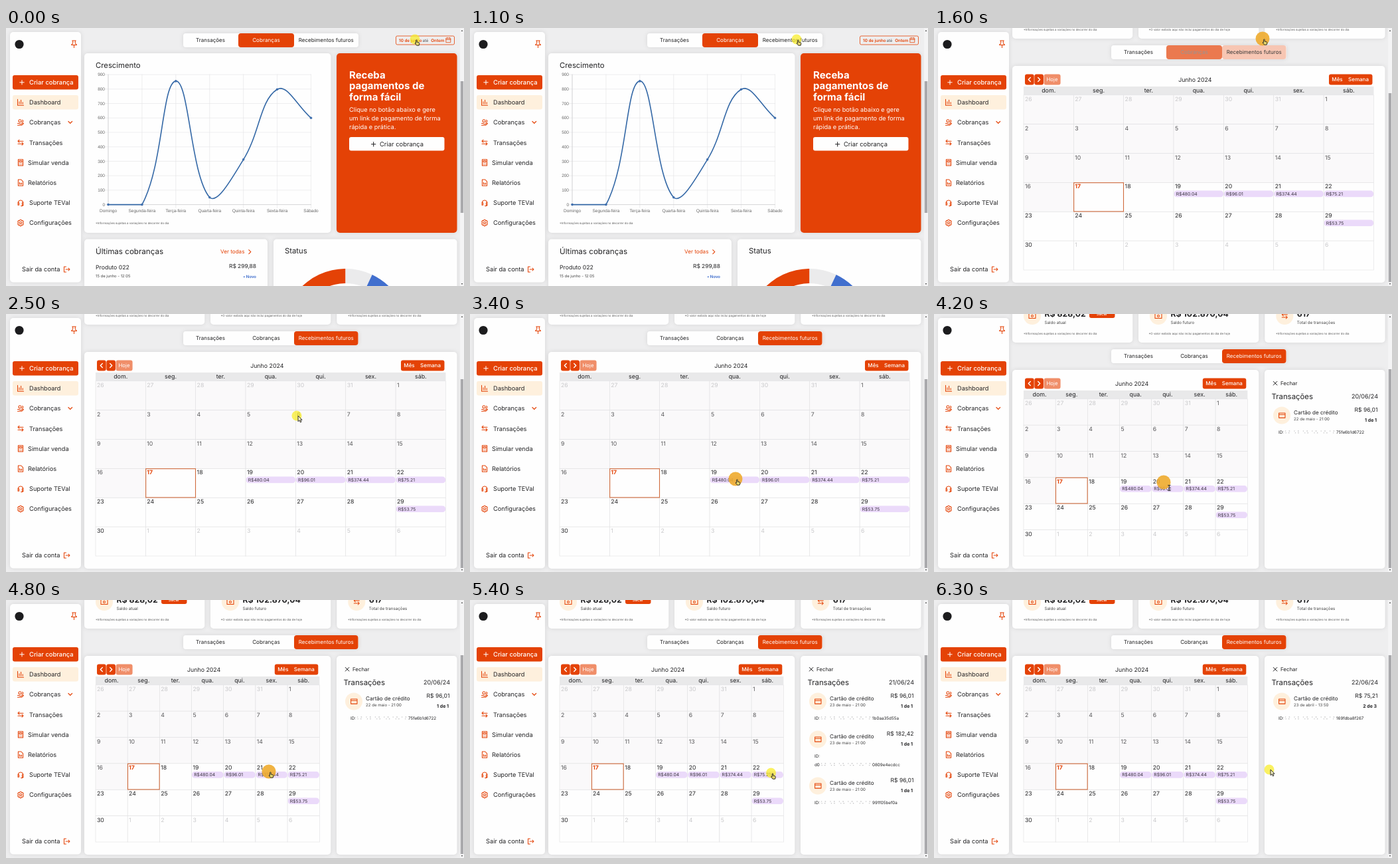
Write an HTML page that moves like this. It is 690x388 px and loops after 6700 ms.

```html
<!DOCTYPE html>
<html lang="pt-BR">
<head>
<meta charset="utf-8">
<title>Painel de cobranças</title>
<style>
  html, body { margin: 0; width: 100%; height: 100%; overflow: hidden; background: #eeeeef; }
  svg { display: block; width: 100vw; height: 100vh; }
  text { font-family: Inter, "Noto Sans", sans-serif; white-space: pre; text-rendering: geometricPrecision; }
  .axis text { font-family: "Liberation Sans", Arial, sans-serif; }
  .line { fill: none; stroke-linecap: round; stroke-linejoin: round; }
  .card { filter: drop-shadow(0 0 3px rgba(0, 0, 0, .1)); }
</style>
</head>
<body>
<svg id="stage" viewBox="0 0 690 388" xmlns="http://www.w3.org/2000/svg"></svg>
<script>
const ORANGE = '#e44206', INK = '#232325', CREAM = '#fef0dd', LOOP = 6700, TICK = 100;

// Drawing helpers
const text = (x, y, size, str, { fill = INK, weight = 400, anchor = 'start' } = {}) =>
  `<text x="${x}" y="${y}" font-size="${size}" fill="${fill}" font-weight="${weight}" text-anchor="${anchor}">${str}</text>`;
const rect = (x, y, w, h, fill, r = 0, more = '') =>
  `<rect x="${x}" y="${y}" width="${w}" height="${h}" rx="${r}" fill="${fill}" ${more}/>`;
const card = (x, y, w, h, fill = '#fefefe') => rect(x, y, w, h, fill, 5, 'class="card"');
const line = (d, color = ORANGE, w = 1.05, more = '') =>
  `<path class="line" d="${d}" stroke="${color}" stroke-width="${w}" ${more}/>`;
const icon = (x, y, d, color = ORANGE, w = 1.05) =>
  `<g transform="translate(${x} ${y})">${line(d, color, w)}</g>`;
const group = (id, body) => `<g id="${id}">${body}</g>`;
const mid = { anchor: 'middle' }, end = { anchor: 'end' }, white = { fill: '#fff' };

const PLUS = 'M-3.2 0H3.2M0-3.2V3.2', RIGHT = 'M-1.5-3L1.5 0L-1.5 3', LEFT = 'M1.5-3L-1.5 0L1.5 3';
const SWAP = 'M-4-2H4M-2-4l-2 2 2 2M4 2H-4M2 0l2 2-2 2';
const CREDIT = 'M-4.7-3.6h9.4v7.2h-9.4zM-4.7-1.2h9.4';
const BILL = 'M-5-3.5h10v7h-10zM-1.5 0a1.5 1.5 0 1 0 3 0a1.5 1.5 0 1 0-3 0';

function sidebar() {
  const items = [
    ['Dashboard', 35, 'M-4.5-4.5V4.5H4.5M-2-1V2.3M.6-3.5V2.3M3.2 0V2.3'],
    ['Cobranças', 35, 'M-4.5 1.5h2l2 1h2M-4.5 4.3h6l3-2.6-1-.8-2 1.3M-3-2.2a2 2 0 1 0 4 0a2 2 0 1 0-4 0M1.6-.6a1.5 1.5 0 1 0 1-2.8'],
    ['Transações', 35, SWAP],
    ['Simular venda', 33, 'M-3.6-4.6h7.2v9.2h-7.2zM-2-3h4v2h-4zM-2 1h.1M0 1h.1M2 1h.1M-2 3h.1M0 3h.1M2 3h.1'],
    ['Relatórios', 33, 'M-3.6-4.6h4.4l2.8 2.8v6.4h-7.2zM-1.6 2.5v-3M0 2.5V.8M1.6 2.5v-2'],
    ['Suporte TEVal', 35, 'M-4 1a4 4.8 0 0 1 8 0M-4 0h1.6v3.4h-1.6zM2.4 0h1.6v3.4h-1.6zM4 3.4q0 1.6-3.4 1.4'],
    ['Configurações', 35, 'M-1.6 0a1.6 1.6 0 1 0 3.2 0a1.6 1.6 0 1 0-3.2 0M-1-4.6h2l.5 1.5 1.8-.3 1 1.8-1 1.6 1 1.6-1 1.8-1.8-.3-.5 1.5h-2l-.5-1.5-1.8.3-1-1.8 1-1.6-1-1.6 1-1.8 1.8.3z'],
  ];
  return card(6, 6, 107, 376.5) +
    `<circle cx="20" cy="24.5" r="6.6" fill="#1c1c1e"/>` +
    icon(102.5, 24, 'M-2.8-5h5.6M-1.8-5v4l-2.2 2.4h8l-2.2-2.4v-4M0 1.4v4') +
    rect(10, 71, 99, 21.5, ORANGE, 3) + icon(24, 81.8, PLUS, '#fff', 1) +
    text(35, 85, 9.4, 'Criar cobrança', { fill: '#fff', weight: 500 }) +
    rect(10, 101, 99, 21.5, CREAM, 3) +
    items.map(([name, x, d], i) => {
      const y = 111.8 + 30.2 * i;
      return icon(22, y, d) + text(x, y + 3.3, 9.2, name);
    }).join('') +
    line('M94 140.5l2.8 2.8l2.8-2.8', ORANGE, 1.2) +
    text(24, 366.4, 9.25, 'Sair da conta') +
    icon(91.5, 363, 'M-1-4h-3v8h3M-1.5 0h6M2.5-2l2 2-2 2');
}

function tabs() {
  return rect(267, -10.5, 264, 21, '#fefefe', 4, 'class="card"') +
    rect(350, -10.5, 84, 21, ORANGE, 4, 'id="tab1"') + rect(434, -10.5, 96.5, 21, ORANGE, 4, 'id="tab2"') +
    text(308, 2.7, 8, 'Transações', mid) +
    `<g id="name1">${text(392, 2.7, 8.1, 'Cobranças', { ...mid, fill: 'inherit' })}</g>` +
    `<g id="name2">${text(482.3, 2.7, 8, 'Recebimentos futuros', { ...mid, fill: 'inherit' })}</g>`;
}

const NOTE = '*Informações sujeitas a variações no decorrer do dia';
const note = (x, y, str = NOTE) => text(x, y, 4.4, str, { fill: '#555' });

function chart() {
  const days = ['Domingo', 'Segunda-feira', 'Terça-feira', 'Quarta-feira', 'Quinta-feira', 'Sexta-feira', 'Sábado'];
  const values = [0, 0, 855, 50, 312, 798, 600];
  const px = i => 154 + 50.92 * i, py = v => 265.6 - v * 0.2172;
  const pts = values.map((v, i) => [px(i), py(v)]);
  let out = '';
  for (let v = 0; v <= 900; v += 100)
    out += line(`M149.5 ${py(v)}H459.5`, '#e2e2e4', 0.6) + text(149, py(v) + 2.2, 6.5, v, { ...end, fill: '#666' });
  days.forEach((d, i) => {
    out += line(`M${px(i)} 70V270.5`, '#e2e2e4', 0.6) + text(px(i), 277, 6.5, d, { ...mid, fill: '#666' });
  });
  out += line('M154 70V265.6H459.5', '#c8c8ca', 0.6);

  // Smooth curve: control points follow the neighbours' chord, kept inside the plot
  const cap = y => Math.max(70, Math.min(265.6, y));
  const handles = pts.map((p, i) => {
    const a = pts[i - 1] || p, b = pts[i + 1] || p;
    const da = Math.hypot(p[0] - a[0], p[1] - a[1]), db = Math.hypot(b[0] - p[0], b[1] - p[1]);
    const fa = 0.4 * da / (da + db), fb = 0.4 * db / (da + db);
    const dx = b[0] - a[0], dy = b[1] - a[1];
    return [[p[0] - fa * dx, cap(p[1] - fa * dy)], [p[0] + fb * dx, cap(p[1] + fb * dy)]];
  });
  const curve = pts.map((p, i) => i ? `C${handles[i - 1][1]} ${handles[i][0]} ${p}` : `M${p}`).join('');
  out += line(curve, '#3468a6', 1.6);
  out += pts.map(([x, y]) => `<circle cx="${x}" cy="${y}" r="1.8" fill="#3f6fae"/>`).join('');
  return `<g class="axis">${out}</g>`;
}

function donut() {
  const at = (r, deg) => {
    const a = deg * Math.PI / 180;
    return `${511.5 + r * Math.sin(a)} ${456 - r * Math.cos(a)}`;
  };
  const arc = (a, b, fill) =>
    `<path d="M${at(94, a)}A94 94 0 0 1 ${at(94, b)}L${at(72, b)}A72 72 0 0 0 ${at(72, a)}z" fill="${fill}"/>`;
  return arc(-100, 0, ORANGE) + arc(0, 25.3, '#ebebec') + arc(25.3, 100, '#416fce');
}

function overview() {
  const heading = ['Receba', 'pagamentos de', 'forma fácil'];
  const body = ['Clique no botão abaixo e gere', 'um link de pagamento de forma', 'rápida e prática.'];
  const bold = { fill: ORANGE, weight: 600 };
  return rect(587.5, 12, 88, 13, 'none', 2, `stroke="${ORANGE}" stroke-width=".8"`) +
    text(592, 20.6, 6.3, '10 de junho', bold) + text(627.5, 20.6, 6.1, 'até', { fill: '#555' }) +
    text(660.5, 20.6, 6.3, 'Ontem', { ...bold, ...end }) +
    icon(666.5, 18.3, 'M-3.3-3h6.6v6.4h-6.6zM-3.3-.8h6.6M-1.6-4v1.6M1.6-4v1.6', ORANGE, 0.8) +
    card(118, 38, 371.5, 270) + text(135, 60, 11.3, 'Crescimento') + chart() + note(135, 295.2) +
    card(498, 38, 181.5, 270, ORANGE) +
    heading.map((s, i) => text(517, 75.5 + 16.6 * i, 15, s, { fill: '#fff', weight: 700 })).join('') +
    body.map((s, i) => text(517, 126.3 + 12.9 * i, 9.2, s, white)).join('') +
    rect(517, 164, 143.5, 20.5, '#fefefe', 3) + icon(553.7, 174.7, PLUS, INK) + text(563, 177.6, 9.4, 'Criar cobrança') +
    card(118, 317.5, 276, 90) + text(135, 340.3, 11.6, 'Últimas cobranças') +
    text(323, 339.3, 8.1, 'Ver todas', { fill: ORANGE }) + icon(367.3, 336.6, RIGHT, ORANGE, 1.1) +
    text(135, 363, 8.7, 'Produto 022') + text(135, 375.2, 5.9, '15 de junho - 12:05', { fill: '#444' }) +
    text(377, 361.3, 8.4, 'R$ 299,88', end) + text(377, 376.3, 6, '• Novo', { ...end, fill: '#2f62c8', weight: 600 }) +
    card(403, 317.5, 276.5, 90) + text(420, 338.8, 11.3, 'Status') + donut();
}

function balances(dy) {
  const box = (x, value, label, d) => card(x, -40, 181.3, 56) +
    `<circle cx="${x + 30}" cy="-24" r="13" fill="${CREAM}"/>` + icon(x + 30, -24, d) +
    text(x + 48.5, -23.4, 12.3, value, { weight: 700 }) + text(x + 48.5, -11.8, 6.2, label, { fill: '#444' });
  return `<g transform="translate(0 ${dy})">` +
    box(118, 'R$ 828,02', 'Saldo atual', BILL) + box(308, 'R$ 102.870,04', 'Saldo futuro', BILL) +
    box(498.3, '617', 'Total de transações', SWAP) +
    rect(234, -35, 38.5, 14, ORANGE, 3) + text(253, -25.5, 6, 'Sacar', { ...mid, fill: '#fff', weight: 500 }) +
    note(135, 3.7) + note(323.5, 3.7, '*O valor exibido aqui não inclui pagamentos do dia de hoje') + note(515, 3.7) + '</g>';
}

const EVENTS = { 19: 'R$480.04', 20: 'R$96.01', 21: 'R$374.44', 22: 'R$75.21', 29: 'R$53.75' };

function calendar(top, right) {
  const x0 = 135, w = (right - x0) / 7, y0 = top + 43.8, h = (364 - y0) / 6, by = top + 12.5;
  let out = card(118, top, right + 17 - 118, 383 - top) +
    rect(137, by, 13.7, 16, ORANGE, 3) + rect(151.3, by, 13.7, 16, ORANGE, 3) + rect(165.6, by, 25, 16, '#f08e69', 3) +
    icon(143.8, by + 8, LEFT, '#fff', 1.4) + icon(158.2, by + 8, RIGHT, '#fff', 1.4) +
    text(178, by + 10.9, 7.9, 'Hoje', { ...mid, fill: '#fff' }) +
    text((x0 + right) / 2 - 5.5, top + 23.6, 8.8, 'Junho 2024', mid) +
    rect(right - 67.5, by, 65.5, 16, ORANGE, 3) +
    text(right - 55, by + 10.9, 8, 'Mês', { ...mid, fill: '#fff', weight: 500 }) +
    text(right - 23, by + 10.9, 8, 'Semana', { ...mid, fill: '#fff', weight: 500 }) +
    rect(x0, top + 31, right - x0, 12.8, '#e9e9ea');
  ['dom.', 'seg.', 'ter.', 'qua.', 'qui.', 'sex.', 'sáb.'].forEach((d, c) => {
    out += text(x0 + w * (c + 0.5), top + 40.4, 8.9, d, mid);
  });
  let grid = '', marks = '';
  for (let i = 0; i < 42; i++) {
    const n = i - 5, x = x0 + w * (i % 7), y = y0 + h * Math.floor(i / 7);
    const inside = n > 0 && n < 31, today = n === 17;
    const label = n < 1 ? n + 31 : n > 30 ? n - 30 : n;
    const fill = today ? ORANGE : !inside ? '#c9c9cb' : n < 17 ? '#58585a' : INK;
    grid += rect(x, y, w, h, n < 17 ? '#faf9fa' : '#fefefe', 0, 'stroke="#e0e0e2" stroke-width=".6"');
    if (today) marks += rect(x + 0.3, y + 0.3, w - 0.5, h - 0.6, 'none', 0, 'stroke="#cf6a3c" stroke-width="1.1"');
    marks += text(x + 1.9, y + 9, 8.7, label, { fill, weight: today ? 700 : 400 });
    if (inside && EVENTS[n])
      marks += rect(x + 0.5, y + 12.2, w - 0.8, 9.6, '#ebdafa', 4.5) + text(x + 3.6, y + 19.4, 6.8, EVENTS[n], { fill: '#3a3340' });
  }
  return out + grid + marks;
}

// Each entry: amount, day, count, visible tail of the id, optional visible head
const PANELS = [
  ['19/06/24', ['R$ 96,01', '21 de maio - 21:00', '1 de 1', '4c07be92d31a'], ['R$ 182,42', '21 de maio - 21:00', '1 de 1', '0b71c5e84fd', 'd0'], ['R$ 201,61', '21 de maio - 21:00', '1 de 1', '62d9f0c17be']],
  ['20/06/24', ['R$ 96,01', '22 de maio - 21:00', '1 de 1', '75fe6b1d6722']],
  ['21/06/24', ['R$ 96,01', '23 de maio - 21:00', '1 de 1', '1b0aa35d55a'], ['R$ 182,42', '23 de maio - 21:00', '1 de 1', '0809e4ecdcc', 'd0'], ['R$ 96,01', '23 de maio - 21:00', '1 de 1', '991f05bef0a']],
  ['22/06/24', ['R$ 75,21', '23 de abril - 13:50', '2 de 3', '169fdba8f267']],
];

function entry([amount, day, count, tail, head], i) {
  const y = [0, 57, 127][i], idY = y + (head ? 192.5 : 179.6);
  return `<circle cx="524" cy="${y + 152.5}" r="13" fill="${CREAM}"/>` + icon(524.3, y + 152.5, CREDIT) +
    text(542, y + 151.2, 8.1, 'Cartão de crédito') + text(542, y + 160, 6.1, day, { fill: '#444' }) +
    text(668.5, y + 147.3, 8.6, amount, end) + text(667, y + 162.2, 7, count, { ...end, weight: 700 }) +
    text(519, y + 179.6, 6.3, 'ID:') + (head ? text(519, idY, 6.3, head) : '') +
    line(`M529.5 ${idY - 3.6}H603`, '#88888b', 0.7, 'stroke-dasharray=".3 5.2 .8 7.1"') +
    line(`M530 ${idY - 0.8}H603`, '#88888b', 0.7, 'stroke-dasharray=".3 4.1 .6 9.3"') +
    text(606, idY, 6.3, tail);
}

const details = () => card(498, 84, 181.5, 299) + line('M511.3 101.4l5.6 5.6M516.9 101.4l-5.6 5.6', INK, 1) +
  text(522, 107, 7.9, 'Fechar') + text(508.5, 127.8, 11.4, 'Transações') +
  PANELS.map(([date, ...list], i) =>
    group('panel' + i, text(669, 127, 9, date, end) + list.map(entry).join(''))).join('');

const pointer = (id, d, fill = '#fff') =>
  `<path id="${id}" d="${d}" fill="${fill}" stroke="#222" stroke-width=".9" stroke-linejoin="round"/>`;

const $ = id => document.getElementById(id);
$('stage').innerHTML = rect(0, 0, 690, 388, '#eeeeef') + sidebar() +
  group('scene0', overview()) +
  group('scene1', balances(0) + calendar(57, 662.5)) +
  group('scene2', balances(27) + calendar(84, 472.3) + details()) +
  group('tabs', tabs()) +
  rect(684.2, 0, 5.8, 388, '#f4f4f5') + rect(684.8, 0, 4.4, 10, '#a9a9ac', 0, 'id="thumb"') +
  '<path d="M685.6 5l1.4-2l1.4 2zM685.6 384l1.4 2l1.4-2z" fill="#555"/>' +
  group('cursor', '<circle id="halo"/>' +
    pointer('hand', 'M1.6 1.4q.8-1 1.6 0v2.7l2.9.8q1 .4.8 1.4l-.7 2.9h-3.6l-2.5-3.2q0-1.1 1.5-.3z', '#e3d36a') +
    pointer('arrow', 'M2 0v8.6l2-1.8 1.5 3.1 1.5-.8-1.5-2.9h2.6z', '#f3edc4') +
    pointer('beam', 'M6.2 4.6h4.4M8.4 4.6v8M6.2 12.6h4.4', '#222'));

// Cursor track: time, x, y
const PATH = [
  [0, 616, 17], [300, 572, 21], [800, 572, 21], [1100, 492, 17], [1500, 492, 17], [1600, 495, 16],
  [2100, 495, 16], [2800, 401, 242], [3200, 400, 248], [3500, 400, 248], [4000, 346, 253], [4200, 346, 253],
  [4700, 396, 258], [4900, 396, 258], [5400, 453.5, 260], [5900, 453.5, 260], [6100, 504, 253], [6200, 504, 253],
  [6300, 505, 255], [LOOP, 505, 255],
];
const CLICKS = [[1600, 1800], [3400, 3600], [4100, 4300], [4800, 5000], [5500, 5700]];
const SHAPES = [[0, 'hand'], [200, 'arrow'], [1000, 'hand'], [2200, 'arrow'], [2800, 'hand'], [3900, 'beam'], [4500, 'hand'], [5900, 'arrow']];
const VIEWS = [{ tab: 18.5, thumb: 80, size: 198 }, { tab: 36.5, thumb: 98, size: 284 }, { tab: 63.5, thumb: 83, size: 299 }];

const set = (id, attrs) => { for (const k in attrs) $(id).setAttribute(k, attrs[k]); };
const show = (id, on) => set(id, { display: on ? 'inline' : 'none' });
const gray = (from, to, k) => { const g = Math.round(from + (to - from) * k); return `rgb(${g},${g},${g})`; };

function place(t) {
  const i = PATH.findIndex(p => p[0] > t), [ta, xa, ya] = PATH[i - 1], [tb, xb, yb] = PATH[i];
  const u = (t - ta) / (tb - ta), k = u * u * (3 - 2 * u);
  return [xa + (xb - xa) * k, ya + (yb - ya) * k];
}

function draw(t) {
  const scene = t < 1600 ? 0 : t < 3500 ? 1 : 2, view = VIEWS[scene];
  const panel = t < 4200 ? 0 : t < 4900 ? 1 : t < 5600 ? 2 : 3;
  for (let i = 0; i < 3; i++) show('scene' + i, i === scene);
  PANELS.forEach((_, i) => show('panel' + i, i === panel));

  const k = t < 1600 ? 0 : Math.min(1, 0.3 + (t - 1600) / 200);
  set('tabs', { transform: `translate(0 ${view.tab})` });
  set('tab1', { opacity: 1 - k });
  set('tab2', { opacity: k });
  $('name1').firstChild.setAttribute('fill', gray(255, 35, Math.min(1, k * 1.6)));
  $('name2').firstChild.setAttribute('fill', gray(35, 255, k * k));
  set('thumb', { y: view.thumb, height: view.size });

  const click = CLICKS.some(([a, b]) => t >= a && t < b);
  set('cursor', { transform: `translate(${place(t)})` });
  set('halo', click ? { r: 10.5, fill: '#eeab2e', opacity: 0.9 } : { r: 7.5, fill: '#f8ec24', opacity: 0.72 });
  const shape = SHAPES.filter(s => s[0] <= t).pop()[1];
  for (const id of ['hand', 'arrow', 'beam']) show(id, id === shape);
}

let start, last;
function frame(now) {
  start ??= now;
  const t = Math.floor((now - start) / TICK + 0.01) * TICK % LOOP;
  if (t !== last) draw(last = t);
  requestAnimationFrame(frame);
}
draw(0);
requestAnimationFrame(frame);
</script>
</body>
</html>
```
